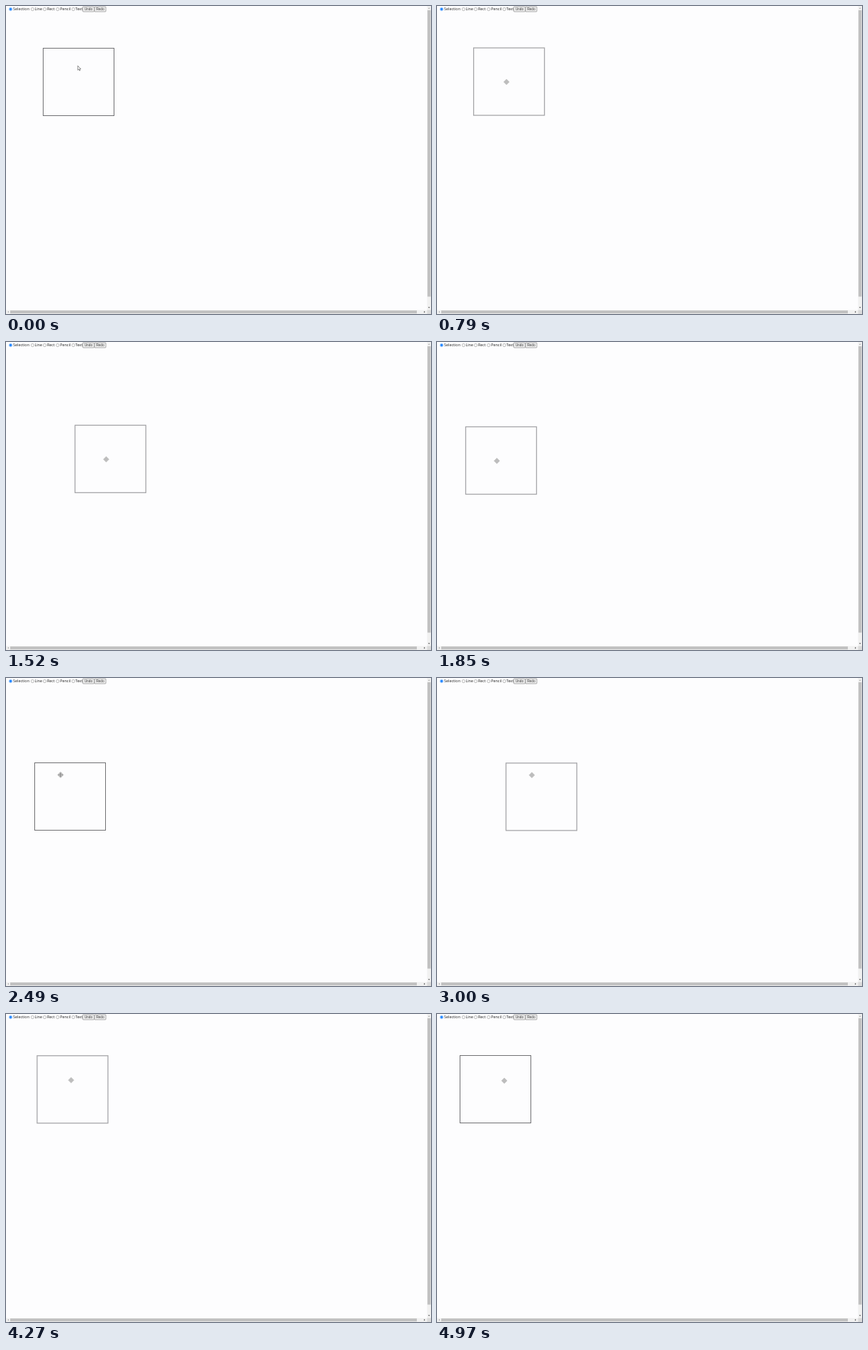
An HTML page that plays this animation: 600x434 px, repeating every 5 s.

```html
<!DOCTYPE html>
<html lang="en">
<head>
<meta charset="utf-8">
<title>Drawing board</title>
<style>
html, body { margin: 0; width: 100%; height: 100%; overflow: hidden; background: #fdfdfe; }
svg { display: block; width: 100vw; height: 100vh; }
.label { font: 5.45px "Open Sans", "Noto Sans", sans-serif; fill: #222; }
.button { font: 4.8px "Liberation Sans", Arial, sans-serif; fill: #333; }
</style>
</head>
<body>
<svg viewBox="0 0 600 434">
  <rect width="600" height="434" fill="#fdfdfe"/>
  <g id="toolbar"></g>

  <g fill="#f1f1f1">
    <rect x="594.5" width="5.5" height="434"/>
    <rect y="428.5" width="600" height="5.5"/>
  </g>
  <g fill="#c1c1c1">
    <rect x="595" y="6" width="4.5" height="403.5"/>
    <rect x="6" y="429" width="574" height="4.2"/>
  </g>
  <rect x="594.5" y="428.5" width="5.5" height="5.5" fill="#dcdcdc"/>
  <path d="M595.9 3.8h2.6l-1.3-1.5z M3.8 429.8v2.6l-1.5-1.3z" fill="#a3a3a3"/>
  <path d="M595.9 424.2h2.6l-1.3 1.5z M590.2 429.8v2.6l1.5-1.3z" fill="#444"/>

  <rect id="box" width="100" height="95" fill="none"/>

  <path id="arrow" d="M0 0V6.1L1.5 4.8L2.5 7L3.4 6.6L2.5 4.5H4.3Z"
        fill="#fff" stroke="#444" stroke-width=".6"/>
  <g id="move">
    <path id="diamond" d="M0-4L4 0L0 4L-4 0Z" stroke-width=".6"/>
    <g id="detail" fill="none" stroke="#555" stroke-width=".6">
      <path d="M0-3.4V3.4M-3.4 0H3.4" stroke="#888"/>
      <path d="M-1.3-2.1H1.3M-1.3 2.1H1.3M-2.1-1.3V1.3M2.1-1.3V1.3"/>
      <rect x="-.6" y="-.6" width="1.2" height="1.2" fill="#fff"/>
    </g>
  </g>
</svg>
<script>
const LOOP = 5000, STEP = 30;
const $ = id => document.getElementById(id);

function set(el, attrs) {
  for (const key in attrs) el.setAttribute(key, attrs[key]);
}

function add(tag, attrs, text = "") {
  const el = document.createElementNS("http://www.w3.org/2000/svg", tag);
  set(el, attrs);
  el.textContent = text;
  $("toolbar").append(el);
}

function addRadio(cx, x, text, checked) {
  const stroke = checked ? "#0075ff" : "#767676";
  add("circle", { cx, cy: 4.5, r: 2.1, fill: "#fff", stroke, "stroke-width": .5 });
  if (checked) add("circle", { cx, cy: 4.5, r: 1.4, fill: stroke });
  add("text", { x, y: 6.2, class: "label" }, text);
}

function addButton(x, text) {
  add("rect", { x, y: 1, width: 16.2, height: 7, rx: .8, fill: "#efefef", stroke: "#767676", "stroke-width": .6 });
  add("text", { x: x + 8.1, y: 6.1, class: "button", "text-anchor": "middle" }, text);
}

addRadio(6.5, 10, "Selection", true);
addRadio(37.4, 40.4, "Line");
addRadio(54.6, 57.9, "Rect");
addRadio(72.9, 76.2, "Pencil");
addRadio(95, 97.8, "Text");
addButton(108.3, "Undo");
addButton(124.8, "Redo");

// A stroke ends at `to`; the optional handles bend it and `power` eases it in.
const stroke = (start, end, to, handles, power = 1) => ({ start, end, to, handles, power });

const drags = [
  stroke(780, 1300, [111, 98], [[-80, -15], [110, -20]], 1.6),
  stroke(1300, 1850, [40, 119], [[122, 125], [62, 118]]),
  stroke(2610, 3010, [97, 119], [[42, 145], [97, 124]]),
  stroke(3420, 3755, [100, 62], [[98, 115], [103, 62]]),
  stroke(3880, 4520, [32, 58], [[65, 66], [28, 53]])
];

// Pointer position relative to the box corner.
const hovers = [
  stroke(30, 550, [47, 48.5], [[70, 35], [72, 60]]),
  stroke(780, 1520, [44.5, 48.5]),
  stroke(2180, 2460, [37, 17.5]),
  stroke(3210, 3420, [48.5, 35]),
  stroke(4850, 4970, [63, 36], [[28, 46], [42, 44]])
];

function along(from, { start, end, to, handles, power }, t) {
  const u = Math.min((t - start) / (end - start), 1) ** power, v = 1 - u;
  return from.map((a, i) => handles
    ? v ** 3 * a + 3 * v * u * (v * handles[0][i] + u * handles[1][i]) + u ** 3 * to[i]
    : v * a + u * to[i]);
}

const follow = (home, strokes, t) =>
  strokes.filter(s => t > s.start).reduce((p, s) => along(p, s, t), home);

const boxAt = t => follow([52, 59], drags, t);
const pointerAt = t => {
  const box = boxAt(t);
  return follow([49, 27], hovers, t).map((g, i) => g + box[i]);
};

const isMoving = (at, t) => {
  const [x, y] = at(t), [px, py] = at(t - STEP);
  return Math.hypot(x - px, y - py) > .3;
};

const show = (id, on) => set($(id), { display: on ? "inline" : "none" });
const place = (id, x, y) => set($(id), { transform: `translate(${x} ${y})` });

function draw(t) {
  const [x, y] = boxAt(t), [px, py] = pointerAt(t);
  const dragged = isMoving(boxAt, t), faded = isMoving(pointerAt, t);

  place("box", x + .5, y + .5);
  set($("box"), { stroke: dragged ? "#a6a6a9" : "#707073", "stroke-width": dragged ? 1.3 : 1 });
  place("arrow", px + .3, py - 1.8);
  place("move", px, py);
  show("arrow", t < STEP);
  show("move", t >= STEP);
  show("detail", !faded);
  set($("diamond"), {
    fill: faded ? "#bdbdbd" : "#f2f2f2",
    stroke: faded ? "#c4c4c4" : "#8a8a8a"
  });
}

const start = performance.now();
function tick() {
  draw((performance.now() - start) % LOOP);
  requestAnimationFrame(tick);
}
tick();
</script>
</body>
</html>
```
